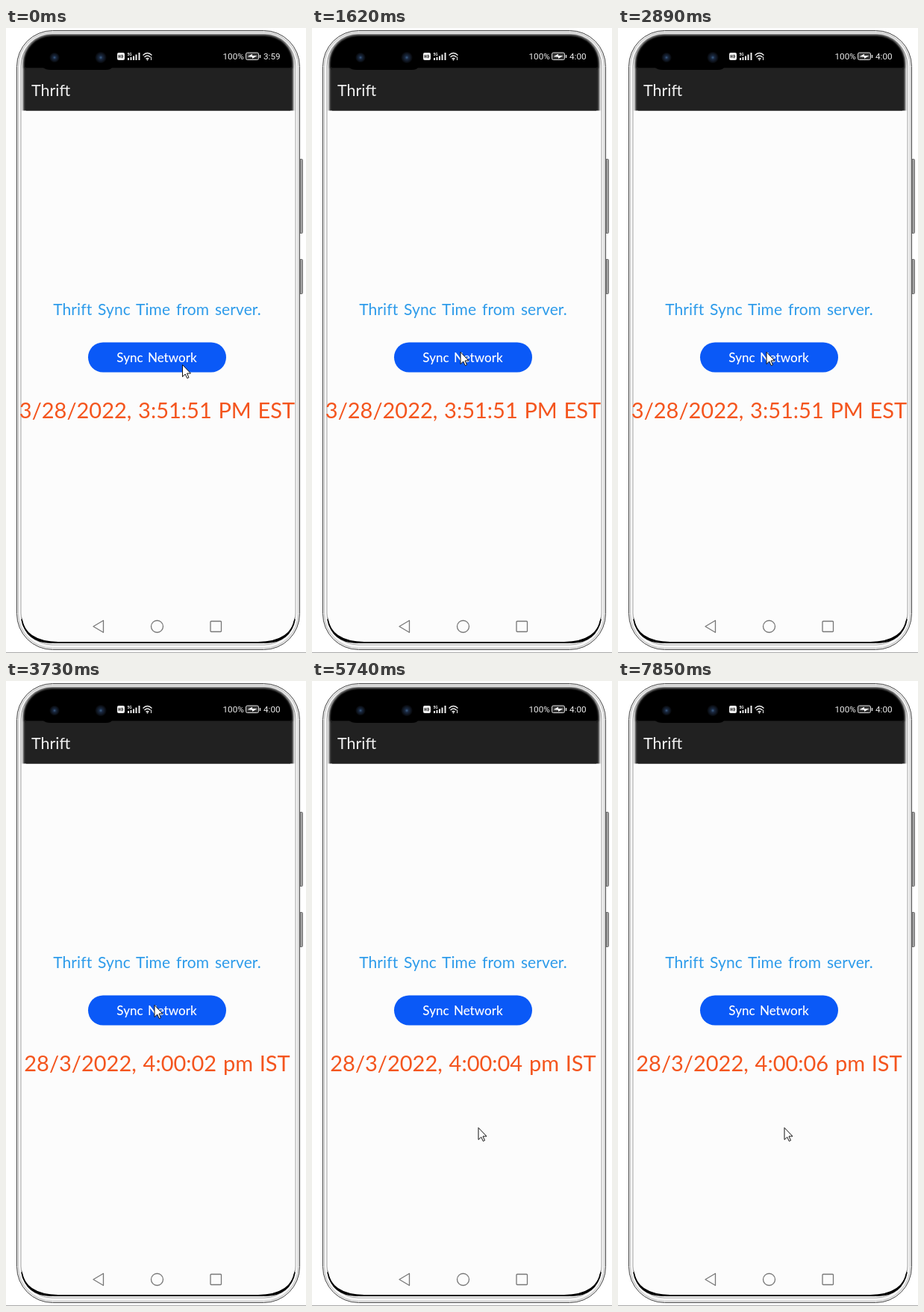
An HTML page for the animation above (8 s loop, 402x836 px).

```html
<!DOCTYPE html>
<html lang="en">
<head>
<meta charset="utf-8">
<title>Thrift time sync</title>
<style>
  html, body { margin: 0; height: 100%; overflow: hidden; background: #fff; }
  svg { display: block; width: 402px; height: 836px; }
  text { font-family: Lato, "Open Sans", sans-serif; }
  .mid { text-anchor: middle; }
  .status text { font: 11.7px Roboto, sans-serif; fill: #eee; }
  .line { fill: none; stroke: #777; stroke-width: 1.3; }
</style>
</head>
<body>
<svg viewBox="0 0 402 836">
  <defs>
    <filter id="soft" x="-10%" y="-10%" width="120%" height="120%"><feGaussianBlur stdDeviation="1.5"/></filter>
    <clipPath id="top"><rect width="402" height="110.5"/></clipPath>
    <linearGradient id="key"><stop stop-color="#777"/><stop offset="1" stop-color="#bbb"/></linearGradient>
    <radialGradient id="lens">
      <stop stop-color="#3d5f86"/><stop offset=".3" stop-color="#1a2941"/>
      <stop offset=".75" stop-color="#0c1119"/><stop offset="1" stop-color="#000"/>
    </radialGradient>
  </defs>

  <!-- Phone body -->
  <path d="M0 835.5H402" stroke="#aaa"/>
  <g fill="url(#key)" stroke="#555" stroke-width=".8">
    <rect x="393.5" y="175.5" width="4" height="99" rx="1"/>
    <rect x="393.5" y="309.5" width="4" height="46" rx="1"/>
  </g>
  <rect x="14.5" y="3.5" width="379" height="828" rx="48" fill="#f6f6f6" stroke="#444"/>
  <rect x="16.5" y="5.5" width="375" height="824" rx="46" fill="none" stroke="#bdbdbd"/>
  <rect x="20" y="9" width="368" height="816" rx="42" fill="#fcfcfc" stroke="#a5a5a5"/>
  <path d="M21 788V790Q24 822 65 823H343Q384 822 387 790V788Q383 820 338 821H70Q25 820 21 788Z" fill="#000"/>
  <path d="M21 791Q25 818 62 822Q28 823 21 791ZM387 791Q383 818 346 822Q380 823 387 791Z" stroke="#000" stroke-width="1.5"/>

  <!-- Status bar and title bar -->
  <g clip-path="url(#top)">
    <g filter="url(#soft)">
      <rect x="23" y="9" width="362" height="140" rx="38"/>
      <rect x="23" y="54" width="362" height="80" fill="#212121"/>
    </g>
    <rect x="27" y="54" width="354" height="57" fill="#212121"/>
    <path d="M27 40H381V53H142Q140 56 134 56H60Q53 56 50 53H27Z"/>
  </g>
  <circle cx="65" cy="39.500" r="7" fill="url(#lens)"/>
  <circle cx="127" cy="39.500" r="8" fill="url(#lens)"/>
  <g class="status">
    <rect x="149" y="33" width="10" height="10" rx="2" fill="#eee"/>
    <path d="M151 36V40M153 36V40M151 38H153M155 36.300V39.700H156Q157.300 38 156 36.300Z" fill="none" stroke="#111" stroke-width=".8"/>
    <text x="162.500" y="37" style="font-size:5px;font-weight:700">5G</text>
    <path d="M164 43V40M167.500 43V39M171 43V37.500M174.500 43V35.500M178.500 43V33" stroke="#eee" stroke-width="2"/>
    <path d="M183.500 36.500Q189.500 30.500 195.500 36.500M185.500 39Q189.500 35 193.500 39M187.500 41.300Q189.500 39.500 191.500 41.300" fill="none" stroke="#eee" stroke-width="1.4"/>
    <circle cx="189.500" cy="42.500" r="1" fill="#eee"/>
    <path d="M194.500 38.500V43" stroke="#eee"/>
    <text x="290.500" y="42">100%</text>
    <rect x="321.500" y="33" width="17" height="9.500" rx="2" fill="#333" stroke="#ddd"/>
    <path d="M340.500 36V40" stroke="#ddd" stroke-width="1.5"/>
    <path d="M323.500 38.200L330 34.800V37H336.500L330 41V38.700Z" fill="#fff"/>
    <text id="clock" x="345" y="42"></text>
  </g>
  <text x="34" y="91" font-size="21.500" fill="#f0f0f0">Thrift</text>

  <!-- App content -->
  <text class="mid" x="202.500" y="383.500" font-size="21" word-spacing="2.300" letter-spacing=".1" fill="#2d9bea">Thrift Sync Time from server.</text>
  <rect id="button" x="110" y="420.500" width="185" height="40" rx="20"/>
  <text class="mid" x="202" y="446.500" font-size="17" font-weight="500" word-spacing="2" fill="#fff">Sync Network</text>
  <text id="time" class="mid" x="202.500" y="522" font-size="29" word-spacing="1.300" fill="#f4551e"></text>

  <!-- Navigation -->
  <g class="line">
    <path d="M117 800.500L130.500 792.500V808.500Z" stroke-linejoin="round"/>
    <circle cx="202.500" cy="800.500" r="8"/>
    <rect x="274" y="793.500" width="14.500" height="14" rx="1"/>
  </g>

  <path id="cursor" d="M.5.5V16.500L4.200 13L6.800 18.500L9 17.500L6.500 12H11.500Z" fill="#fff" stroke="#111"/>
</svg>
<script>
  const LOOP = 8000;
  const $ = id => document.getElementById(id);

  // Each track holds [start ms, ...values]; a value holds until the next start.
  const pointer = [
    [0, 236, 450], [150, 198, 422], [280, 342, 503], [430, 263, 462],
    [580, 248.5, 452], [730, 227, 443], [880, 218, 440], [1030, 204, 435],
    [1160, 198.5, 433], [4920, 200, 442], [5040, 205, 483],
    [5190, 213, 530], [5320, 220, 574], [5440, 222.5, 597]
  ];
  const press = [[0, 0], [2070, .15], [2220, .4], [2350, .75], [2470, 1], [2890, 0]];
  const seconds = [[3730, 2], [4770, 3], [5740, 4], [6570, 5], [7570, 6]];

  const at = (track, t) => track.findLast(step => step[0] <= t);
  const mix = (a, b, k) => a + (b - a) * k;

  function setText(id, value) {
    if ($(id).textContent !== value) $(id).textContent = value;
  }

  function draw(now) {
    const t = now % LOOP;
    const [, x, y] = at(pointer, t);
    const [, k] = at(press, t);
    const tick = at(seconds, t);

    $('cursor').setAttribute('transform', `translate(${x} ${y})`);
    $('button').setAttribute('fill', `rgb(10,${mix(89, 78, k)},${mix(247, 220, k)})`);
    setText('clock', t < 1620 ? '3:59' : '4:00');
    setText('time', tick ? `28/3/2022, 4:00:0${tick[1]} pm IST` : '3/28/2022, 3:51:51 PM EST');
    requestAnimationFrame(draw);
  }
  requestAnimationFrame(draw);
</script>
</body>
</html>
```
